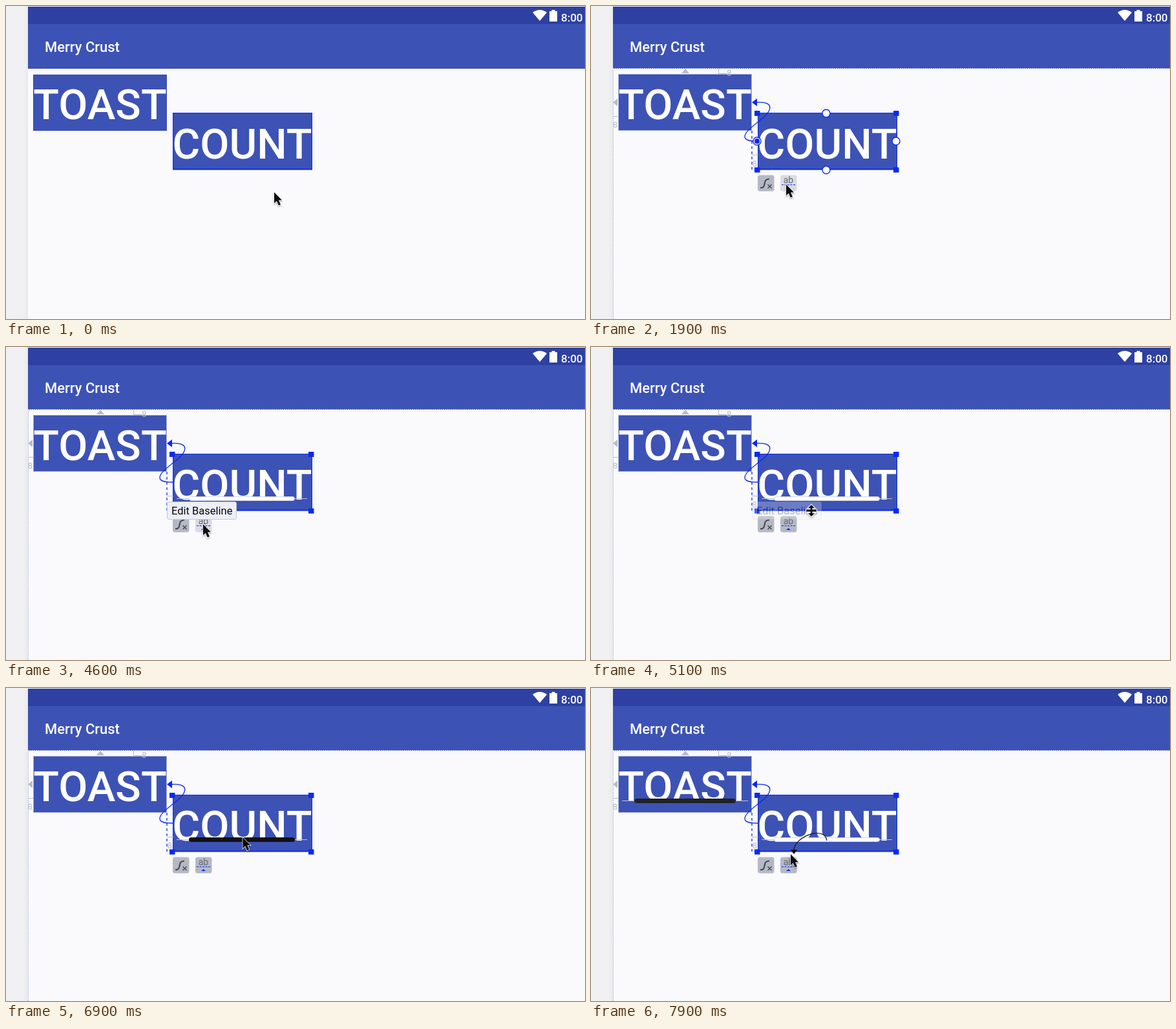
Recreate the animation shown at these times as an HTML page. Size 896 by 484 pixels, loop 8000 ms.

```html
<!DOCTYPE html>
<html lang="en">
<head>
<meta charset="utf-8">
<title>Baseline constraint</title>
<style>
html, body { margin: 0; width: 100%; height: 100%; overflow: hidden; background: #fafafc; }
svg { display: block; width: 896px; height: 484px; font-family: Roboto, sans-serif; }
.label { font-size: 65.5px; font-weight: 500; fill: #fff; text-anchor: middle; }
.line { fill: none; stroke: #0a2af0; }
.handle { fill: #fff; stroke: #0a2af0; stroke-width: 1.4; }
.hint { fill: #b7bcc9; font-size: 13.5px; }
.hintline { fill: none; stroke: #b7bcc9; }
</style>
</head>
<body>
<svg viewBox="0 0 896 484">
  <defs>
    <linearGradient id="edge">
      <stop offset="0" stop-color="#f1f1f3"/>
      <stop offset="1" stop-color="#e9e9ec"/>
    </linearGradient>
    <filter id="shadow" x="-50%" y="-50%" width="200%" height="200%">
      <feDropShadow dx="0" dy="1.5" stdDeviation="1.2" flood-opacity=".35"/>
    </filter>
  </defs>

  <rect width="896" height="484" fill="#fafafc"/>
  <rect width="34" height="484" fill="#f1f1f3"/>
  <rect x="27" width="7" height="484" fill="url(#edge)"/>
  <rect x="34" y="1" width="862" height="27" fill="#2e40a1"/>
  <rect x="34" y="28" width="862" height="69" fill="#3d52b5"/>
  <g fill="#fff" font-weight="500">
    <text x="60" y="71" font-size="22">Merry Crust</text>
    <path d="M826 23L815 10Q826 2 837 10Z"/>
    <path d="M841 8h3.500v-2h5v2h3.500v16h-12z"/>
    <text x="859" y="23.500" font-size="17">8:00</text>
  </g>

  <rect x="42" y="106" width="207" height="87" fill="#3d52b5"/>
  <rect x="258" y="165" width="216" height="88" fill="#3d52b5"/>
  <rect x="258.500" y="165.500" width="215" height="87" class="line"/>
  <path d="M258 252.500H474" class="line" stroke-width="2"/>
  <text x="145.500" y="175" class="label">TOAST</text>
  <text x="365.500" y="235.500" class="label">COUNT</text>

  <g id="selection">
    <path d="M34.500 484V96.500H896" fill="none" stroke="#b9c1e4" stroke-dasharray="2 1"/>
    <rect x="42.500" y="105.500" width="206" height="87" fill="none" stroke="#a9b4dd"/>
    <path d="M140 104L146 97L152 104ZM34 149L41 143V155Z" class="hint"/>
    <path d="M197.500 97V104.500H210M34 170.500H43M249 230.500H259" class="hintline"/>
    <text x="210" y="108" class="hint">8</text>
    <text x="33.500" y="188" class="hint">8</text>
    <text x="249.500" y="248" class="hint">8</text>
    <path d="M249 193V254" class="line" stroke-width="1.300" stroke-dasharray="4 4"/>
    <path d="M256 149C272 148 283 152 273 166C265 177 238 191 238 202C238 208 247 209 258 209" class="line" stroke-width="1.300"/>
    <path d="M249 149L257 143V155Z" fill="#0a2af0"/>
    <path d="M253 162h8.500v8h-8.500zM468 162h8.500v8h-8.500zM253 249.500h8.500v8h-8.500zM468 249.500h8.500v8h-8.500z" fill="#0a2af0"/>
    <g id="anchors">
      <circle cx="364" cy="166" r="6" class="handle"/>
      <circle cx="472" cy="209" r="6" class="handle"/>
      <circle cx="364" cy="253.500" r="6" class="handle"/>
      <circle cx="257" cy="209" r="6" class="handle"/>
      <circle cx="257" cy="209" r="4" fill="#0a2af0"/>
    </g>
    <rect x="258" y="261.500" width="25.500" height="25" rx="3.500" fill="#b5b9c6"/>
    <path d="M262 281C273 282 264 267 276 267.500" fill="none" stroke="#484b55" stroke-width="2.200"/>
    <path d="M273.500 276l6 6m0-6l-6 6" stroke="#484b55" stroke-width="1.500"/>
    <rect id="baselineButton" x="293" y="261.500" width="25.500" height="25" rx="3.500"/>
    <text x="305.500" y="274" font-size="14" text-anchor="middle" fill="#686b75">ab</text>
    <path d="M295 276.500H317" class="line" stroke-dasharray="3 1.500"/>
    <path d="M302 283L305.500 280L309 283Z" fill="#0a2af0"/>
  </g>

  <g id="countBar">
    <path d="M264 234.500H466" stroke="#b9bfd6"/>
    <rect x="283.500" y="231.500" width="163" height="6" rx="3" fill="#fff" stroke="#d4d7e2"/>
    <rect id="countPulse" x="283" y="231" width="164" height="7" rx="3.500" fill="#0c0c0e"/>
  </g>
  <g id="toastBar">
    <path d="M48 174.500H243" stroke="#b9bfd6"/>
    <rect x="67.500" y="171.500" width="156" height="6" rx="3" fill="#fff" stroke="#d4d7e2"/>
    <rect id="toastPulse" x="67" y="171" width="157" height="7" rx="3.500" fill="#0c0c0e"/>
  </g>
  <g id="drag">
    <path id="dragLine" fill="none" stroke="#111" stroke-width="1.200"/>
    <path id="dragHead" d="M-5 -7H5L0 0Z" fill="#111"/>
  </g>
  <g id="tooltip">
    <rect x="249.500" y="239.500" width="107" height="27" rx="2.500" fill="#eceff5" stroke="#c6cad6"/>
    <text x="256" y="259" font-size="16.500" fill="#08090c">Edit Baseline</text>
  </g>
  <g id="cursor" filter="url(#shadow)" stroke="#fff" stroke-width="1.300" paint-order="stroke">
    <path id="arrow" d="M0 0V17L3.800 13.500L6.800 20.300L10 18.900L7 12.300H12Z" fill="#0a0a0c"/>
    <path id="move" d="M0 -9L5 -4H1.500V-1.500H8V1.500H1.500V4H5L0 9L-5 4H-1.500V1.500H-8V-1.500H-1.500V-4H-5Z" fill="#0a0a0c" stroke-width="2"/>
  </g>
</svg>
<script>
const LOOP = 8000, STEP = 100;
const el = id => document.getElementById(id);

// Rows: time, then values; linear in between
const cursorPath = [
  [0, 415, 288], [300, 360, 232], [500, 360, 232], [900, 337, 252],
  [1400, 301, 285], [1700, 302, 279], [1800, 302, 279], [1900, 302, 276],
  [4500, 302, 276], [4700, 308, 272], [5000, 332, 258], [5100, 341, 253], [5400, 361, 248],
  [5500, 365, 237], [5700, 369, 231], [5900, 369, 231], [6300, 367, 231],
  [7200, 366, 231], [7400, 355, 236], [7700, 319, 252], [7900, 309, 257]
];
const selectionFade = [[0, 0], [300, 1]];
const tooltipFade = [[3100, 0], [3200, .55], [3300, 1], [4700, 1], [5100, .27], [5300, 0]];

function sample(rows, t) {
  const next = rows.findIndex(row => row[0] > t);
  if (next === 0) return rows[0].slice(1);
  if (next < 0) return rows[rows.length - 1].slice(1);
  const a = rows[next - 1], b = rows[next];
  const k = (t - a[0]) / (b[0] - a[0]);
  return a.slice(1).map((v, i) => v + (b[i + 1] - v) * k);
}

const between = (t, from, to) => t >= from && t < to;
const fade = (id, value) => el(id).setAttribute("opacity", value);
const show = (id, on) => el(id).style.display = on ? "" : "none";
const place = (id, x, y) => el(id).setAttribute("transform", `translate(${x} ${y})`);
const pulse = (t, peak) => .5 + .5 * Math.cos(2 * Math.PI * (t - peak) / 1000);

function draw(t) {
  const [x, y] = sample(cursorPath, t);
  const moving = between(t, 5100, 5500);
  const dragging = t >= 7300;
  place("cursor", x, y);
  show("arrow", !moving);
  show("move", moving);

  fade("selection", sample(selectionFade, t)[0]);
  fade("tooltip", sample(tooltipFade, t)[0]);
  show("anchors", t < 3300);
  const hover = between(t, 1400, 4800);
  el("baselineButton").setAttribute("fill", hover ? "#dadce3" : "#b5b9c6");

  show("countBar", t >= 3300);
  fade("countPulse", between(t, 5500, 7300) ? pulse(t, 5850) : 0);
  show("toastBar", dragging);
  fade("toastPulse", pulse(t, 7800));

  show("drag", dragging);
  const tipX = x + 5, tipY = y;
  el("dragLine").setAttribute("d",
    `M365 236C362 212 ${tipX} ${tipY - 27} ${tipX} ${tipY - 6}`);
  place("dragHead", tipX, tipY);
}

const start = performance.now();
function tick() {
  const t = (performance.now() - start) % LOOP;
  draw(Math.floor(t / STEP) * STEP);
  requestAnimationFrame(tick);
}
draw(0);
requestAnimationFrame(tick);
</script>
</body>
</html>
```
